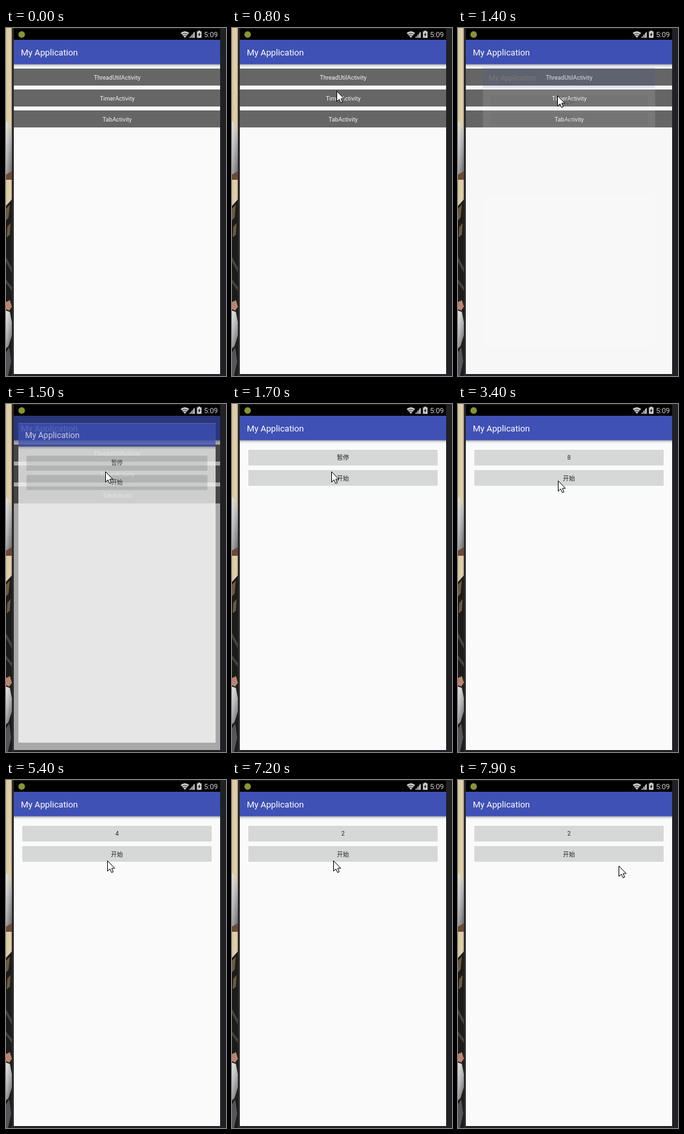
These frames come from a looping animation (337x532 px, 8 s). An HTML page:

```html
<!DOCTYPE html>
<html lang="en">
<head>
<meta charset="utf-8">
<title>Countdown app</title>
<style>
  html, body { margin: 0; width: 100%; height: 100%; overflow: hidden; background: #202125; }
  svg { display: block; width: 337px; height: 532px; }
  text { font-family: Roboto, "Noto Sans CJK SC", "Noto Sans CJK", sans-serif; }
  .title { font-size: 13.2px; fill: #fff; }
  .row { font-size: 9.1px; fill: #f4f4f4; text-anchor: middle; }
  .btn { font-size: 9.2px; fill: #222; text-anchor: middle; }
</style>
</head>
<body>
<svg viewBox="0 0 337 532">
  <defs>
    <linearGradient id="shade" x2="0" y2="1">
      <stop stop-color="#000" stop-opacity=".28"/>
      <stop offset="1" stop-color="#000" stop-opacity="0"/>
    </linearGradient>
    <linearGradient id="sand" x2="1" y2="0">
      <stop stop-color="#d8c69c"/>
      <stop offset=".7" stop-color="#e2d3ae"/>
      <stop offset="1" stop-color="#b5a684"/>
    </linearGradient>
    <linearGradient id="steel" x2=".6" y2="1">
      <stop stop-color="#e9e9e6"/>
      <stop offset=".5" stop-color="#b9babb"/>
      <stop offset="1" stop-color="#77777a"/>
    </linearGradient>
    <g id="bar">
      <rect x="12" y="18" width="316" height="511" fill="#fafafa"/>
      <rect x="12" y="55" width="316" height="5" fill="url(#shade)"/>
      <rect x="12" y="18" width="316" height="37.5" fill="#3f51b5"/>
      <text class="title" x="22.8" y="42">My Application</text>
    </g>
  </defs>

  <rect width="337" height="532" fill="#202125"/>

  <!-- wallpaper strip -->
  <rect width="9" height="532" fill="url(#sand)"/>
  <path d="M0 142 L5 148 L9 168 V222 L0 232Z" fill="url(#steel)"/>
  <path d="M0 224 L9 219 V232 H0Z" fill="#6d4a38"/>
  <path d="M0 272 L9 262 V532 H0Z" fill="#1d1b19"/>
  <path d="M0 276 L6 270 L4 290 L0 294Z M2 304 L7 298 L6 316 L1 320Z" fill="#6b5a40"/>
  <path d="M0 350 L9 366 V374 L0 358Z M0 384 L9 396 V402 L0 390Z" fill="#45433f"/>
  <path d="M0 419 L6 416 L9 426 L5 432 L0 430Z" fill="#b98672"/>
  <path d="M0 432 L6 434 L9 450 V470 L4 486 L0 490Z" fill="url(#steel)"/>
  <path d="M0 496 L5 488 L8 510 L3 532 H0Z" fill="#55565a"/>
  <rect x="9" width="3" height="532" fill="#2a2a2c"/>

  <!-- status bar -->
  <rect x="12" y="1" width="316" height="17" fill="#000"/>
  <circle cx="24" cy="10" r="5" fill="#8a9433"/>
  <g fill="#d2d2d2">
    <path d="M274 15 L267.5 7.6 Q274 2.6 280.5 7.6Z"/>
    <path d="M280.5 15 L289 5.5 V15Z"/>
    <path d="M292.5 5.2 H294.6 V4 H297.4 V5.2 H299.5 V15 H292.5Z"/>
    <text x="303.3" y="14" font-size="11">5:09</text>
  </g>
  <path d="M269.5 9.8 Q274 6.4 278.5 9.8 M271.3 12 Q274 9.9 276.7 12 M283.5 11 V15 M286.2 8 V15" fill="none" stroke="#000" stroke-width=".8"/>
  <path d="M297 6.6 L294 10.6 H295.7 L295 13.7 L298 9.6 H296.3Z" fill="#000"/>

  <g>
    <use href="#bar"/>
    <g id="rows"></g>
    <rect id="dim" x="12" y="18" width="316" height="511"/>
  </g>
  <g id="panel">
    <use href="#bar"/>
    <rect x="25" y="70" width="290" height="24" rx="1.3" fill="#d6d7d7"/>
    <rect id="start" x="25" y="101" width="290" height="24" rx="1.3"/>
    <text id="count" class="btn" x="170" y="85"></text>
    <text class="btn" x="170" y="116.5">开始</text>
  </g>
  <path id="cursor" d="M.5 .5 V16.4 L4.2 12.9 L6.8 18.5 L9.3 17.4 L6.9 12 H11.6Z" fill="#fff" stroke="#000" stroke-width="1"/>
</svg>
<script>
const LOOP = 8000, STEP = 100;
const el = id => document.getElementById(id);
const dim = el("dim"), panel = el("panel"), start = el("start"), count = el("count"), cursor = el("cursor");

el("rows").innerHTML = ["ThreadUtilActivity", "TimerActivity", "TabActivity"].map((name, i) => {
  const y = 62 + 32.2 * i;
  return `<rect x="12" y="${Math.round(y)}" width="316" height="26" fill="#666"/>
    <text class="row" x="170.3" y="${y + 16.5}">${name}</text>`;
}).join("");

// time, x, y
const path = [
  [100, 276, 141], [300, 238, 126], [500, 200, 104], [700, 168, 89], [900, 152, 103],
  [1700, 152, 103], [2100, 152, 114], [3300, 152, 114], [3400, 153, 117],
  [3500, 155, 122], [3900, 155, 122], [4000, 155, 123], [7400, 155, 123], [7900, 246, 131]
];
// time, scale, panel opacity, dimming
const opening = [
  [1300, .8, 0, 0], [1400, .835, .13, .012], [1500, .956, .756, .33], [1600, .995, .97, .4], [1700, 1, 1, .4]
];
const labels = [[0, "暂停"], [2600, "8"], [3500, "7"], [4500, "5"], [5400, "4"], [6300, "3"], [7200, "2"]];

function sample(keys, t) {
  const i = keys.findIndex(k => k[0] > t);
  if (i < 0) return keys[keys.length - 1].slice(1);
  if (i === 0) return keys[0].slice(1);
  const a = keys[i - 1], b = keys[i], p = (t - a[0]) / (b[0] - a[0]);
  return a.slice(1).map((v, j) => v + (b[j + 1] - v) * p);
}

function draw(time) {
  const t = Math.floor((time % LOOP) / STEP) * STEP;

  const [scale, alpha, dark] = sample(opening, t);
  panel.setAttribute("opacity", alpha);
  panel.setAttribute("transform", `translate(170 273.5) scale(${scale}) translate(-170 -273.5)`);
  dim.setAttribute("opacity", dark);

  start.setAttribute("fill", t === 2500 ? "#babcbc" : "#d6d7d7");
  count.textContent = labels.filter(l => l[0] <= t).pop()[1];

  const [x, y] = sample(path, t).map(Math.round);
  cursor.setAttribute("visibility", t < 100 ? "hidden" : "visible");
  cursor.setAttribute("transform", `translate(${x} ${y})`);
}

const begin = performance.now();
function tick() {
  draw(performance.now() - begin);
  requestAnimationFrame(tick);
}
tick();
</script>
</body>
</html>
```
